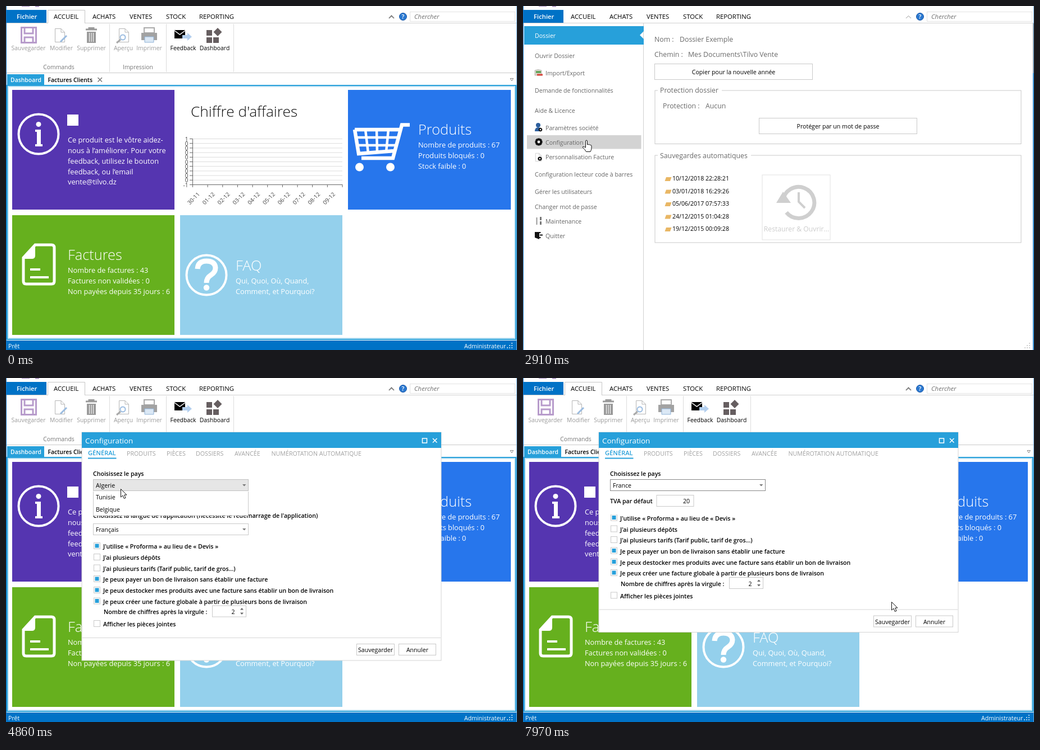
Write an HTML page that moves like this. It is 910x615 px and loops after 8 s.

```html
<!DOCTYPE html>
<html lang="fr">
<head>
<meta charset="utf-8">
<title>Configuration</title>
<style>
html, body { margin: 0; width: 100%; height: 100%; overflow: hidden; background: #fff; }
svg { display: block; width: 910px; height: 615px; font: 10.6px "Open Sans", "Noto Sans", sans-serif; }
text { white-space: pre; }
.caps { font-size: 11.3px; }
.rib { font-size: 10.4px; text-anchor: middle; }
.tile { font-size: 12.75px; fill: #fff; }
.big { font-size: 25.4px; font-weight: 300; }
.mid { font-size: 12.3px; fill: #6a6a6a; }
.semi { font-weight: 600; }
.c { text-anchor: middle; }
.e { text-anchor: end; }
.box { fill: #fff; stroke: #c9c9c9; }
.off { fill: #9b9b9b; }

/* 1% is 80 ms */
.anim { animation: 8s step-end infinite; }
#backstage { animation-name: backstage; }
@keyframes backstage { 0%, 38.2% { visibility: hidden; } 12.95% { visibility: visible; } }
#homeTab { animation-name: homeTab; }
@keyframes homeTab { 0%, 38.2% { opacity: 1; } 13.9% { opacity: 0; } }
#fileHot { animation-name: fileHot; }
@keyframes fileHot { 0%, 14.8% { opacity: 0; } 9.2% { opacity: 1; } }
#menuHot { animation-name: menuHot; }
@keyframes menuHot {
  0%, 27.85% { transform: translateY(-300px); }
  20.85% { transform: translateY(77px); }
  22.85% { transform: translateY(108px); }
  25% { transform: translateY(139px); }
  28.8% { transform: translateY(175px); }
  29.75% { transform: translateY(205px); }
  31.6%, 100% { transform: translateY(231px); }
}
#dialog { transform-origin: 455px 301px; animation-name: dialog; }
@keyframes dialog {
  0% { opacity: 0; transform: scale(.96); }
  39.15% { opacity: .14; transform: scale(.967); }
  40.1% { opacity: .4; transform: scale(.976); }
  41.1% { opacity: .75; transform: scale(.99); }
  42.1%, 100% { opacity: 1; transform: none; }
}
.before { animation-name: before; }
@keyframes before { 0% { visibility: inherit; } 92.85%, 100% { visibility: hidden; } }
.after { animation-name: after; }
@keyframes after { 0% { visibility: hidden; } 92.85%, 100% { visibility: inherit; } }
#rows { animation-name: rows; }
@keyframes rows { 0% { transform: none; } 92.85%, 100% { transform: translateY(-50.5px); } }
#comboHot { animation-name: comboHot; }
@keyframes comboHot { 0%, 65.7% { opacity: 0; } 48.1% { opacity: 1; } }
#drop { animation-name: drop; }
@keyframes drop {
  0%, 92.85% { transform: translateY(-120px); }
  60.7% { transform: translateY(-72px); }
  61.7% { transform: translateY(-25px); }
  62.7% { transform: none; }
}
#dropHot { animation-name: dropHot; }
@keyframes dropHot {
  0% { transform: translateY(-200px); }
  65.7%, 78.35% { transform: none; }
  66.65%, 71.45%, 85.95% { transform: translateY(22.5px); }
  69.55%, 73.55%, 77.4% { transform: translateY(45px); }
  67.6%, 76.4% { transform: translateY(67.5px); }
  74.45% { transform: translateY(90px); }
}
#cursor { animation-name: cursor; }
@keyframes cursor {
  0% { transform: translate(920px, 620px); }
  .85% { transform: translate(749px, 569px); animation-timing-function: steps(10); }
  10.1% { transform: translate(42px, 11px); }
  15.85% { transform: translate(42px, 11px); animation-timing-function: steps(10); }
  25.85% { transform: translate(100px, 148px); }
  26.9% { transform: translate(100px, 148px); animation-timing-function: steps(5); }
  31.6% { transform: translate(111px, 240px); }
  42% { transform: translate(111px, 240px); animation-timing-function: steps(7); }
  49.2% { transform: translate(173px, 183px); }
  53.1% { transform: translate(173px, 183px); animation-timing-function: steps(3); }
  55.85% { transform: translate(204px, 198px); }
  64.75% { transform: translate(204px, 198px); animation-timing-function: steps(3); }
  67.6% { transform: translate(206px, 277px); }
  68.65% { transform: translate(206px, 277px); animation-timing-function: steps(3); }
  71.45% { transform: translate(208px, 240px); }
  72.65% { transform: translate(208px, 240px); animation-timing-function: steps(2); }
  74.45% { transform: translate(208px, 304px); }
  75.45% { transform: translate(208px, 319px); animation-timing-function: steps(3); }
  78.35% { transform: translate(211px, 222px); }
  84.85% { transform: translate(211px, 222px); animation-timing-function: steps(2); }
  87.1% { transform: translate(211px, 242px); }
  92.85% { transform: translate(211px, 242px); animation-timing-function: steps(7); }
  99.6%, 100% { transform: translate(656px, 400px); }
}
#arrow { animation-name: arrow; }
@keyframes arrow { 0%, 38.2% { opacity: 1; } 36.35% { opacity: 0; } }
#hand { animation-name: hand; }
@keyframes hand { 0%, 38.2% { opacity: 0; } 36.35% { opacity: 1; } }
</style>
</head>
<body>
<svg viewBox="0 0 910 615">
  <defs>
    <clipPath id="dropClip"><path d="M150 203H440V330H150Z"/></clipPath>
    <path id="gear" d="M0-5V5M-5 0H5M-3.6-3.6 3.6 3.6M3.6-3.6-3.6 3.6" stroke="#111" stroke-width="3.2"/>
    <g id="cog"><use href="#gear" transform="scale(1.3)"/><circle r="5" fill="#111"/><circle r="2.4" fill="#fff"/></g>
    <path id="page" d="M.5.5H11L17.500 7V24.500H.5ZM11 .5V7H17.500" fill="#fff" stroke="#b5b5b5"/>
    <path id="grip" d="M8 0h2M4 4h2m2 0h2M0 8h2m2 0h2m2 0h2" stroke-width="2"/>
  </defs>
  <rect width="910" height="615" fill="#fff"/>

  <!-- ribbon -->
  <path d="M28 0H42M52 .5H59" stroke="#a58cc0" stroke-width="2"/>
  <path d="M1 30.500H910" stroke="#d0d0d0"/>
  <g id="homeTab" class="anim"><path d="M74.500 31V7.500H140.500V31" fill="#fff" stroke="#c6c6c6"/><path d="M682 22l4.500-4.500L691 22" fill="none" stroke="#444" stroke-width="1.600"/></g>
  <path d="M682 22l4.500-4.500L691 22" fill="none" stroke="#999" stroke-width="1"/>
  <rect x="1" y="7" width="71" height="23" fill="#0072c6"/>
  <rect id="fileHot" class="anim" x="1" y="7" width="71" height="23" fill="#2a8ad4"/>
  <g class="caps">
    <text x="19" y="23" class="semi" fill="#fff">Fichier</text>
    <text x="85" y="23">ACCUEIL</text><text x="154" y="23">ACHATS</text>
    <text x="220" y="23">VENTES</text><text x="285" y="23">STOCK</text><text x="344" y="23">REPORTING</text>
  </g>
  <circle cx="707" cy="19" r="6.500" fill="#2a78d0" stroke="#1b57a6"/>
  <text x="707" y="23" class="c semi" fill="#fff">?</text>
  <rect x="719.500" y="10.500" width="187" height="17" fill="#fff" stroke="#e2e2e2"/>
  <text x="727" y="23" class="caps" font-style="italic" fill="#707070">Chercher</text>

  <path d="M184.500 32V118M285.500 32V118M405.500 32V118" stroke="#dcdcdc"/>
  <path d="M1 119.500H910" stroke="#c9c9c9"/>
  <path d="M27.500 38.500H53.500V65.500H27.500ZM33 39V49H48V39M33 65V56H48V65" fill="none" stroke="#b79bcb" stroke-width="3"/>
  <use href="#page" x="87" y="40"/><path d="M97 64l11-11" stroke="#9bbce0" stroke-width="3"/>
  <path d="M142 42H162M148 41V39.500H156V41" stroke="#9a9a9a" stroke-width="3" fill="none"/>
  <path d="M144 46H160V66H144Z" fill="#9a9a9a"/><path d="M148.500 48V64M152 48V64M155.500 48V64" stroke="#fff"/>
  <use href="#page" x="201" y="40"/><circle cx="208" cy="56" r="4.500" fill="#fff" stroke="#9bbce0" stroke-width="2"/><path d="M204 60l-7 6" stroke="#aaa" stroke-width="3"/>
  <path d="M246 39H264V48H246Z" fill="#fff" stroke="#aaa" stroke-width="2"/><path d="M241 48H269V61H241Z" fill="#a2a2a2"/><path d="M247 55H263V65H247Z" fill="#dbe8f5" stroke="#8fb2d6"/>
  <path d="M300 43H319V58H300Z" fill="#000"/><path d="M300 44l9.500 7 9.500-7" fill="none" stroke="#fff" stroke-width="1.500"/>
  <path d="M314 52H323V48L331 55 323 62V58H314Z" fill="#b3cfee"/>
  <path d="M357 43H367V53H357ZM357 56H367V66H357ZM369 56H379V66H369ZM377 39l7.500 7.500L377 54l-7.500-7.500Z" fill="#665e60"/>
  <g class="rib off"><text x="40" y="79">Sauvegarder</text><text x="98.500" y="79">Modifier</text><text x="152" y="79">Supprimer</text><text x="209" y="79">Aperçu</text><text x="255" y="79">Imprimer</text></g>
  <g class="rib"><text x="315.500" y="79">Feedback</text><text x="371.500" y="79">Dashboard</text><text x="94" y="113" fill="#777">Commands</text><text x="235" y="113" fill="#777">Impression</text></g>

  <!-- document tabs and frame -->
  <rect x="2" y="122" width="66" height="20" fill="#27a0da"/>
  <g class="semi" font-size="10.400"><text x="8" y="136" fill="#fff">Dashboard</text><text x="74.500" y="136">Factures Clients</text></g>
  <path d="M163.500 128l7.500 7.500M171 128l-7.500 7.500" stroke="#777" stroke-width="1.500"/>
  <path d="M898 129.500H903.500L900.700 134Z" fill="none" stroke="#888"/>
  <rect x="2" y="142" width="906" height="454" fill="#fff" stroke="#27a0da" stroke-width="2"/>
  <rect x="4" y="144" width="902" height="450" fill="none" stroke="#c5e5f5" stroke-width="2"/>
  <rect y="598" width="910" height="17" fill="#0072c6"/>
  <text x="4" y="612" fill="#fff">Prêt</text><text x="816" y="612" fill="#fff">Administrateur</text>
  <use href="#grip" x="892" y="603" stroke="#a9cfec"/>

  <!-- dashboard tiles -->
  <path d="M11 150H300V364H11Z" fill="#5535b0"/>
  <path d="M609 150H899V364H609Z" fill="#2776ec"/>
  <path d="M11 374H300V588H11Z" fill="#66b01e"/>
  <path d="M310 374H599V588H310Z" fill="#94d0ec"/>
  <g fill="none" stroke="#fff" stroke-width="4"><circle cx="58" cy="229" r="35.500"/><circle cx="357" cy="481" r="35.500"/></g>
  <circle cx="58" cy="211.500" r="4.500" fill="#fff"/><path d="M52 221H62V247H65V251H52V247H55V225H52Z" fill="#fff"/>
  <path d="M341 470Q342 456 357 456T373 468Q373 476 365 481 357 486 357 495" fill="none" stroke="#fff" stroke-width="9"/><circle cx="357" cy="503.500" r="5.200" fill="#fff"/>
  <rect x="109" y="194" width="20" height="20" fill="#fff"/>
  <g class="tile">
    <text x="110" y="244">Ce produit est le vôtre aidez-</text><text x="110" y="263">nous à l’améliorer. Pour votre</text>
    <text x="110" y="282">feedback, utilisez le bouton</text><text x="110" y="300.500">feedback, ou l’email</text><text x="110" y="319">vente@tilvo.dz</text>
    <text x="734" y="230" class="big">Produits</text><text x="734" y="253">Nombre de produits : 67</text><text x="734" y="272">Produits bloqués : 0</text><text x="734" y="291">Stock faible : 0</text>
    <text x="110" y="454" class="big">Factures</text><text x="110" y="477">Nombre de factures : 43</text><text x="110" y="496">Factures non validées : 0</text><text x="110" y="514.500">Non payées depuis 35 jours : 6</text>
    <text x="409" y="473" class="big">FAQ</text><text x="409" y="496">Qui, Quoi, Où, Quand,</text><text x="409" y="514.500">Comment, et Pourquoi?</text>
  </g>
  <text x="329" y="198" font-size="26.300" font-weight="300" fill="#111">Chiffre d'affaires</text>
  <g id="chart" font-size="10" fill="#444"></g>
  <g fill="none" stroke="#fff">
    <path d="M719 212.500H705L689 272H633M621 221H701M621 221L628 264 691 259" stroke-width="6.500"/>
    <path d="M624 235H698M626.500 249H694M640 221L645 263M660 221L661 262M681 221L677 261" stroke-width="4.500"/>
  </g>
  <circle cx="629.500" cy="288" r="7.500" fill="#fff"/><circle cx="684.500" cy="288" r="7.500" fill="#fff"/>
  <path d="M52 427H81q5 0 5 5V492q0 5-5 5H36q-5 0-5-5V450Z" fill="none" stroke="#fff" stroke-width="5"/>
  <path d="M29 452L52 425V446q0 6-6 6Z" fill="#fff"/><path d="M43 471H61M43 485H76" stroke="#fff" stroke-width="4"/>

  <!-- file menu -->
  <g id="backstage" class="anim">
    <rect y="31" width="910" height="584" fill="#fff"/>
    <path d="M214.500 31V615" stroke="#d0d0d0"/>
    <path d="M2 36H215V45L208 52 215 59V69H2Z" fill="#27a0da"/>
    <text x="21" y="57" fill="#fff">Dossier</text>
    <rect id="menuHot" class="anim" x="7" width="203.500" height="24.500" fill="#d3d3d3"/>
    <g id="menu" fill="#666"></g>
    <path d="M21 115q6-3 12 0V124H21Z" fill="#d9d5c8" stroke="#aaa" stroke-width=".7"/><path d="M23 118h9" stroke="#4a9a45" stroke-width="3"/><path d="M25 123h10" stroke="#d8453a" stroke-width="3"/>
    <circle cx="27" cy="213" r="4" fill="#2d5f9e"/><path d="M21 224q0-7 6-7t6 7Z" fill="#2d5f9e"/><use href="#cog" transform="translate(31 221) scale(.5)"/>
    <use href="#cog" x="28" y="243"/>
    <use href="#page" transform="translate(22 263) scale(.6)"/><use href="#cog" transform="translate(30 273) scale(.55)"/>
    <path d="M24.500 378V391" stroke="#999" stroke-width="2"/><path d="M31.500 377V383M31.500 385V391" stroke="#777" stroke-width="3"/>
    <path d="M21 404H29V417L21 414Z" fill="#111"/><path d="M29 405H31.500M29 414H31.500M30 409.500H35" stroke="#111" stroke-width="2"/>

    <g class="mid">
      <text x="234" y="64">Nom :</text><text x="279" y="64">Dossier Exemple</text>
      <text x="234" y="91">Chemin :</text><text x="294" y="91">Mes Documents\Tilvo Vente</text>
      <rect x="235" y="151" width="652" height="95.500" class="box"/><rect x="240" y="146" width="114" height="10" fill="#fff"/><text x="244" y="155">Protection dossier</text>
      <text x="249" y="183">Protection :</text><text x="325" y="183">Aucun</text>
      <rect x="235" y="267" width="652" height="156" class="box"/><rect x="240" y="262" width="166" height="10" fill="#fff"/><text x="244" y="272">Sauvegardes automatiques</text>
    </g>
    <rect x="234.500" y="103.500" width="281" height="28" class="box"/><text x="375" y="122" class="c">Copier pour la nouvelle année</text>
    <rect x="420.500" y="200.500" width="281" height="28" class="box"/><text x="561" y="219" class="c">Protéger par un mot de passe</text>
    <g id="dates"></g>
    <rect x="426" y="302" width="121" height="116" fill="#fff" stroke="#e2e2e2"/>
    <path d="M463 348A28 28 0 1 1 469 369" fill="none" stroke="#cfcfcf" stroke-width="7"/>
    <path d="M451 352L463 332 477 352Z" fill="#cfcfcf"/><path d="M491 333V350L502 361" fill="none" stroke="#cfcfcf" stroke-width="4"/>
    <text x="487" y="403" class="c" font-size="12.200" fill="#cdcdcd">Restaurer &amp; Ouvrir...</text>
    <use href="#grip" x="893" y="603" stroke="#d0d0d0"/>
    <path d="M908.500 31V120" stroke="#888"/><path d="M908.500 120V615" stroke="#0072c6"/>
  </g>
  <path d="M.5 0V615" stroke="#1878c8"/>
  <path d="M909.500 0V615" stroke="#6aa7d8"/>

  <!-- settings dialog -->
  <g id="dialog" class="anim">
    <rect class="anim before" x="135" y="97" width="640" height="408" fill="#fff" stroke="#d3d3d3"/>
    <rect class="anim after" x="135" y="97" width="640" height="357.500" fill="#fff" stroke="#d3d3d3"/>
    <rect x="135" y="97" width="640" height="28" fill="#27a0da"/>
    <text x="141" y="117" font-size="13.400" fill="#fff">Configuration</text>
    <path d="M741.500 108H749.500V116H741.500ZM760 108l7.500 7.500M767.500 108l-7.500 7.500" fill="none" stroke="#fff" stroke-width="1.500"/>
    <g font-size="10.700" fill="#a2a2a2">
      <text x="146" y="138" class="semi" font-size="11.100" fill="#27a0da">GÉNÉRAL</text>
      <text x="215" y="139">PRODUITS</text><text x="286" y="139">PIÈCES</text><text x="338" y="139">DOSSIERS</text><text x="407" y="139">AVANCÉE</text><text x="472.500" y="139">NUMÉROTATION AUTOMATIQUE</text>
    </g>
    <path d="M146 143.500H196.500" stroke="#27a0da" stroke-width="2"/>
    <text x="155" y="175" class="semi">Choisissez le pays</text>
    <rect x="155.500" y="181.500" width="276" height="20" class="box"/>
    <rect id="comboHot" class="anim" x="155.500" y="181.500" width="276" height="20" fill="#e6e6e6" stroke="#c0c0c0"/>
    <rect class="anim after" x="155.500" y="181.500" width="276" height="20" fill="none" stroke="#888"/>
    <text x="160" y="196" class="anim before">Algerie</text><text x="160" y="196" class="anim after">France</text>
    <path d="M421 190H427.500L424.200 193.500Z" fill="#777"/>
    <text x="155" y="224" class="semi">TVA par défaut</text>
    <rect x="238" y="209.500" width="66" height="20" class="box"/>
    <text x="297" y="224" class="e anim before">17</text><text x="297" y="224" class="e anim after">20</text>
    <g class="anim before">
      <text x="155" y="250" class="semi">Choisissez la langue de l'application (nécessite le redémarrage de l'application)</text>
      <rect x="155.500" y="260.500" width="276" height="20" class="box"/><text x="160" y="275">Français</text>
      <path d="M421 269H427.500L424.200 272.500Z" fill="#777"/>
    </g>
    <g id="rows" class="anim">
      <g id="checks" class="semi"></g>
      <text x="174" y="422" class="semi">Nombre de chiffres après la virgule :</text>
      <rect x="367.500" y="407" width="60" height="20" class="box"/><text x="407.500" y="422" class="e">2</text>
      <path d="M417 414.500H423L420 411ZM417 419.500H423L420 423Z" fill="#666"/>
      <path d="M136 464.500H774" stroke="#d6d6d6"/>
      <rect x="624.500" y="475.500" width="67" height="20" class="box"/><text x="658" y="490" class="c">Sauvegarder</text>
      <rect x="699.500" y="475.500" width="66" height="20" class="box"/><text x="732.500" y="490" class="c">Annuler</text>
    </g>
    <g clip-path="url(#dropClip)"><g id="drop" class="anim">
      <rect x="155.500" y="203.500" width="276" height="114.500" class="box"/>
      <rect id="dropHot" class="anim" x="157" y="206" width="273" height="22" fill="#e9e9e9"/>
      <g id="countries"></g>
    </g></g>
  </g>

  <g id="cursor" class="anim">
    <path id="arrow" class="anim" d="M.5.5V15L4 12 6.300 17.500 9 16.300 6.700 11H11Z" fill="#fff" stroke="#111"/>
    <path id="hand" class="anim" d="M.5 2q0-2 1.500-2t1.500 2V8q1-1.500 2.500 0 1.300-1 2.500.5 2-.5 2.500 1.500V14q0 3-2 6.500H1.500Q-1 16-4.500 13q-.5-2.500 2-1.500L.5 13Z" fill="#fff" stroke="#111"/>
  </g>
</svg>
<script>
const fill = (id, list, draw) => {
  document.getElementById(id).innerHTML = list.map(draw).join('');
};
const range = n => [...Array(n).keys()];
const two = n => String(n).padStart(2, '0');

fill('chart', range(11), i => {
  const y = 237.5 + i * 8.2, x = 332.5 + i * 26.65;
  const label = i ? (i < 10 ? '0' : '-1') : '1';
  const day = i ? two(i) + '-12' : '30-11';
  return `<path d="M333 ${y}H599" stroke="${i < 10 ? '#dcdcdc' : '#666'}"/>
    <path d="M327 ${y}H332.5V319.5M${x} 319V324" fill="none" stroke="#666"/>
    <text x="324.5" y="${y + 4}" class="e">${label}</text>` +
    (i < 10 ? `<text transform="translate(${334 + i * 26.8} 344) rotate(-45)" y="3.5" class="c">${day}</text>` : '');
});

fill('menu', [
  [89, 'Ouvrir Dossier'], [120, 'Import/Export', 1], [151, 'Demande de fonctionnalités'],
  [187, 'Aide &amp; Licence'], [217.5, 'Paramètres société', 1], [244, 'Configuration', 1],
  [270, 'Personnalisation Facture', 1], [301, 'Configuration lecteur code à barres'],
  [332, 'Gérer les utilisateurs'], [358.5, 'Changer mot de passe'], [385, 'Maintenance', 1], [411, 'Quitter', 1]
], ([y, label, icon]) => `<text x="${icon ? 40 : 21}" y="${y + 4}">${label}</text>`);

fill('dates', ['10/12/2018 22:28:21', '03/01/2018 16:29:26', '05/06/2017 07:57:33', '24/12/2015 01:04:28', '19/12/2015 00:09:28'],
  (date, i) => {
    const y = 312 + i * 22.5;
    return `<path d="M255 ${y - 6}H264.500L262 ${y + 1}H252.500Z" fill="#e9b765"/><text x="266" y="${y}">${date}</text>`;
  });

fill('checks', [
  [300.5, 'J\'utilise « Proforma » au lieu de « Devis »', 1], [320.5, 'J\'ai plusieurs dépôts'],
  [340, 'J\'ai plusieurs tarifs (Tarif public, tarif de gros...)'],
  [359.5, 'Je peux payer un bon de livraison sans établir une facture', 1],
  [379.5, 'Je peux destocker mes produits avec une facture sans établir un bon de livraison', 1],
  [399, 'Je peux créer une facture globale à partir de plusieurs bons de livraison', 1],
  [439.5, 'Afficher les pièces jointes']
], ([y, label, on]) => `<rect x="156.500" y="${y - 6}" width="11" height="11" class="box"/>` +
  (on ? `<rect x="158.500" y="${y - 4}" width="7" height="7" fill="#27a0da"/>` : '') +
  `<text x="173" y="${y + 4.5}">${label}</text>`);

fill('countries', ['Algerie', 'France', 'Autre', 'Tunisie', 'Belgique'],
  (name, i) => `<text x="160" y="${221 + i * 22.5}">${name}</text>`);
</script>
</body>
</html>
```
